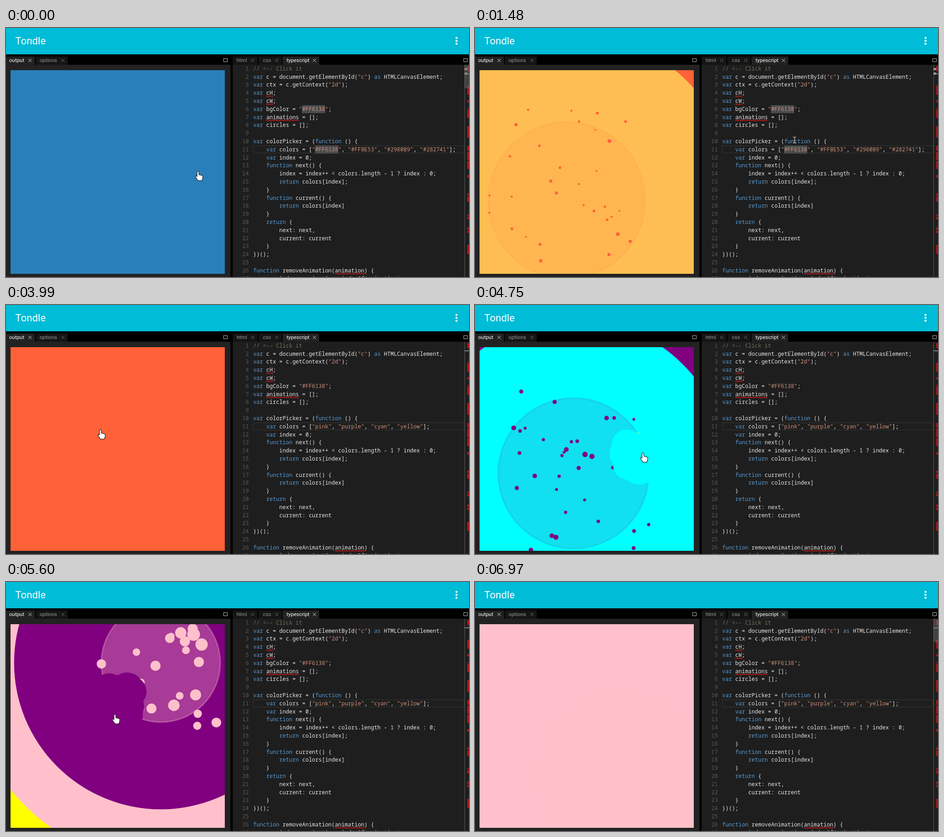
An HTML page for the animation above (7.01 s loop, 1020x549 px).

```html
<!DOCTYPE html>
<html lang="en">
<head>
<meta charset="utf-8">
<title>Ripple playground</title>
<style>
html, body { margin: 0; width: 100%; height: 100%; overflow: hidden; background: #000; }
svg { display: block; }
text { white-space: pre; }
.title { font: 400 22.3px Roboto, sans-serif; fill: #fff; }
.tab { font: 400 11.5px Roboto, sans-serif; fill: #9a9a9a; }
.tab.on { fill: #fff; }
.code { font: 12px "Noto Sans Mono", monospace; fill: #e6e6e6; }
.num { font: 12px "Noto Sans Mono", monospace; fill: #5a5a5a; text-anchor: end; }
.kw { fill: #569cd6; }
.str { fill: #ce9178; }
.rem { fill: #74705d; }
</style>
</head>
<body>
<svg id="stage" width="1020" height="549" viewBox="0 0 1020 549">
  <rect width="1020" height="549"/>
  <rect width="1020" height="58" fill="#00bcd7"/>
  <text class="title" x="20.5" y="36">Tondle</text>
  <g fill="#fff">
    <circle cx="992.5" cy="21.7" r="2.3"/><circle cx="992.5" cy="28.2" r="2.3"/><circle cx="992.5" cy="34.7" r="2.3"/>
  </g>
  <rect y="81" width="494.500" height="468" fill="#222"/>
  <rect x="499.500" y="81" width="520.500" height="468" fill="#1e1e1e"/>
  <g id="tabs"></g>
  <svg id="output" x="10" y="93" width="472" height="449" viewBox="10 93 472 449">
    <rect id="ground" x="10" y="93" width="472" height="449"/>
  </svg>
  <g id="editor">
    <rect x="545" y="259.500" width="464" height="16" fill="none" stroke="#2f2f2f" stroke-width="1.500"/>
    <g id="words" fill="#474b4e">
      <rect x="652" y="170" width="51" height="18"/><rect x="681" y="259" width="51" height="18"/>
    </g>
    <rect id="selection" x="573" y="259" width="418" height="17" fill="#264f78"/>
    <g id="lines"></g>
    <g id="squiggles" fill="none" stroke="#e01b1b" stroke-width="1.100"></g>
    <rect id="caret" y="259" width="1.500" height="17" fill="#ddd"/>
  </g>
  <g id="ruler">
    <path d="M1010.500 81V549" stroke="#5c5c5c"/>
    <g id="marks" fill="#b01414"></g>
    <g id="wordMarks" fill="#8f8f8f"><rect x="1010" y="88" width="6" height="5"/><rect x="1010" y="98" width="6" height="5"/></g>
    <path d="M1010 101H1020" stroke="#a0a0a0" stroke-width="1.500"/>
    <rect id="slider" x="1010" y="81" width="10" height="52" fill="#797979"/>
  </g>
  <path id="hand" fill="#fff" stroke="#111" stroke-width="1.100" stroke-linejoin="round"
    d="M-2 2a2 2 0 0 1 4 0v5.500l6.500 1.500q2.300.6 2.200 2.800l-.7 4.500-1.400 4.200h-8.600l-4.600-7q-1.600-2.200 0-3.200 1.200-.6 2.600 1.200z"/>
  <path id="beam" fill="none" stroke="#d8d8d8" stroke-width="1.200" d="M-3.500-6.500h2.500l1 1 1-1h2.500M0-5.500v11M-3.500 6.500h2.500l1-1 1 1h2.500"/>
</svg>
<script>
const LOOP = 7010;
const PITCH = 7.2, LINE = 17.8, CODE_X = 544.5;
const $ = id => document.getElementById(id);
const show = (el, on) => el.setAttribute('visibility', on ? 'visible' : 'hidden');

function add(parent, tag, attrs, html) {
  const el = document.createElementNS('http://www.w3.org/2000/svg', tag);
  for (const key in attrs) el.setAttribute(key, attrs[key]);
  if (html) el.innerHTML = html;
  parent.appendChild(el);
  return el;
}

// Tab bar: label, text x, left edge, right edge, active
const tabs = [
  ['output', 7, 0, 63.5, 1], ['options', 74, 65.5, 136, 0],
  ['html', 508, 499.5, 554, 0], ['css', 566, 556, 607, 0], ['typescript', 618, 609, 690, 1]
];
for (const [label, x, left, right, on] of tabs) {
  add($('tabs'), 'rect', { x: left, y: 63, width: right - left, height: 18, fill: on ? '#222' : '#151515' });
  add($('tabs'), 'text', { x, y: 75, class: on ? 'tab on' : 'tab' }, label);
  add($('tabs'), 'path', { d: `M${right - 14} 68l7 7m0-7l-7 7`, stroke: on ? '#ddd' : '#777', 'stroke-width': 1 });
}
for (const x of [479.5, 1008.5])
  add($('tabs'), 'rect', { x, y: 67.5, width: 8, height: 7, fill: 'none', stroke: '#bbb' });

// Code
const hexLine = '    var colors = ["#FF6138", "#FFBE53", "#2980B9", "#282741"];';
const nameLine = '    var colors = ["pink", "purple", "cyan", "yellow"];';
const source = `// <-- Click it
var c = document.getElementById("c") as HTMLCanvasElement;
var ctx = c.getContext("2d");
var cH;
var cW;
var bgColor = "#FF6138";
var animations = [];
var circles = [];

var colorPicker = (function () {
${hexLine}
    var index = 0;
    function next() {
        index = index++ < colors.length - 1 ? index : 0;
        return colors[index];
    }
    function current() {
        return colors[index]
    }
    return {
        next: next,
        current: current
    }
})();

function removeAnimation(animation) {
    var index = animations.indexOf(animation);`.split('\n');

const highlight = line => line.replace(/&/g, '&amp;').replace(/</g, '&lt;')
  .replace(/(\/\/.*)|("[^"]*")|\b(var|function|return|as)\b/g, (word, rem, str) =>
    `<tspan class="${rem ? 'rem' : str ? 'str' : 'kw'}">${word}</tspan>`);

const baseline = i => 93.8 + i * LINE;
const rows = source.map((line, i) => {
  add($('lines'), 'text', { x: 535, y: baseline(i), class: 'num' }, String(i + 1));
  return add($('lines'), 'text', { x: CODE_X, y: baseline(i), class: 'code' }, highlight(line));
});

function squiggle(row, col, length) {
  let d = `M${CODE_X + col * PITCH} ${baseline(row) + 4}`;
  for (let i = 0; i < length * PITCH / 4; i++) d += 'q1-3 2-1.2t2 1.2';
  add($('squiggles'), 'path', { d });
}
squiggle(3, 4, 2);
squiggle(4, 4, 2);
squiggle(6, 4, 10);
squiggle(25, 25, 9);

const marks = [[84, 11], [127, 20], [159, 5], [176, 2], [180, 18], [216, 26], [260, 11], [273, 18], [293, 18],
  [324, 6], [365, 5], [372, 11], [411, 3], [416, 6], [440, 5], [447, 5], [478, 20]];
for (const [y, height] of marks) add($('marks'), 'rect', { x: 1016, y, width: 4, height });

// Ripples: start time, centre, colour before, colour after
const hex = ['#FF6138', '#FFBE53', '#2980B9', '#282741'];
const names = ['pink', 'purple', 'cyan', 'yellow'];
const RELOAD = 3400;
const clicks = [
  [10, 424, 318, hex, 3], [650, 310, 345, hex, 0], [1115, 202, 380, hex, 1],
  [4045, 208, 275, names, 1], [4437, 217, 371, names, 2], [4728, 358, 331, names, 3],
  [5287, 355, 178, names, 0], [5425, 341, 178, names, 1], [5578, 250, 265, names, 2],
  [5770, 209, 357, names, 3], [6169, 327, 428, names, 0]
];
const RIPPLE = 472 * 0.4;

let seed = 71;
function random(low, high) {
  seed = (seed * 16807) % 2147483647;
  return low + (high - low) * seed / 2147483647;
}
const clamp = p => Math.max(0, Math.min(1, p));
const outQuart = p => 1 - (1 - clamp(p)) ** 4;
const outExpo = p => p >= 1 ? 1 : 1 - 2 ** (-10 * clamp(p));

function makeRipple([start, x, y, palette, index]) {
  const before = palette[(index + 3) % 4];
  const group = add($('output'), 'g', {});
  const fill = add(group, 'circle', { cx: x, cy: y, fill: palette[index] });
  const ring = add(group, 'circle', { cx: x, cy: y, fill: before, stroke: before, 'stroke-width': 3 });
  const reach = Math.hypot(Math.max(x - 10, 482 - x), Math.max(y - 93, 542 - y));
  const particles = Array.from({ length: 32 }, () => ({
    el: add(group, 'circle', { fill: before }),
    dx: random(-RIPPLE, RIPPLE),
    dy: random(-RIPPLE, RIPPLE) * 1.15,
    size: random(24, 46),
    life: random(930, 1100)
  }));

  return t => {
    const age = t - start;
    const live = age >= 0 && (palette === names || t < RELOAD);
    show(group, live);
    if (!live) return;
    fill.setAttribute('r', reach * outQuart(age / 750));
    const grow = outExpo(age / 1030);
    ring.setAttribute('r', RIPPLE * grow);
    ring.setAttribute('fill-opacity', 1 - grow);
    ring.setAttribute('stroke-opacity', 1 - grow);
    for (const { el, dx, dy, size, life } of particles) {
      const p = outExpo(age / life);
      const r = size * (1 - p);
      el.setAttribute('cx', x + dx * p);
      el.setAttribute('cy', y + dy * p);
      el.setAttribute('r', r < 0.5 ? 0 : r);
    }
  };
}
const ripples = clicks.map(makeRipple);

// Pointer: time, x, y
const path = [
  [0, 423, 316], [40, 423, 316], [650, 310, 345], [1115, 202, 380], [1180, 206, 378], [1480, 704, 247],
  [1900, 748, 266], [3400, 748, 266], [3950, 208, 275], [4070, 208, 275], [4437, 217, 371],
  [4728, 358, 331], [4750, 370, 326], [5287, 355, 178], [5425, 341, 178], [5578, 250, 270],
  [5600, 240, 292], [5770, 209, 357], [6169, 327, 428], [6210, 333, 435], [6400, 340, 430],
  [6800, 1040, 330], [LOOP, 1040, 330]
];
function pointerAt(t) {
  const i = path.findIndex(point => point[0] > t);
  const [t0, x0, y0] = path[i - 1], [t1, x1, y1] = path[i];
  const p = (t - t0) / (t1 - t0), e = p * p * (3 - 2 * p);
  return [x0 + (x1 - x0) * e, y0 + (y1 - y0) * e];
}

const within = (t, a, b) => t >= a && t < b;
const ramp = (t, a, b) => clamp((t - a) / (b - a));
let shownLine = hexLine;

function render(t) {
  $('ground').setAttribute('fill', t < RELOAD ? '#2980B9' : '#FF6138');
  ripples.forEach(draw => draw(t));

  const line = t < 3080 ? hexLine : nameLine;
  if (line !== shownLine) rows[10].innerHTML = highlight(shownLine = line);
  show($('words'), t < 1900);
  show($('wordMarks'), t < 1900);
  show($('selection'), within(t, 2730, 3080));

  const atEnd = t >= 2400;
  $('caret').setAttribute('x', CODE_X + (t >= 3080 ? 54 : atEnd ? 62 : 28) * PITCH);
  show($('caret'), within(t, 1900, 2250) || within(t, 2400, 2730) || within(t, 3080, 3500));

  const flagged = !within(t, 5900, 6600);
  show($('squiggles'), flagged);
  show($('marks'), flagged);

  const hover = 1 - ramp(t, 300, 700) + ramp(t, 1500, 1600) - ramp(t, 3500, 3900) + ramp(t, 6600, 6700);
  $('slider').setAttribute('opacity', 0.4 * hover);

  const [x, y] = pointerAt(t);
  const overOutput = x < 497;
  for (const id of ['hand', 'beam']) $(id).setAttribute('transform', `translate(${x} ${y})`);
  show($('hand'), overOutput);
  show($('beam'), !overOutput);
}

const begin = performance.now();
function tick() {
  render((performance.now() - begin) % LOOP);
  requestAnimationFrame(tick);
}
tick();
</script>
</body>
</html>
```
